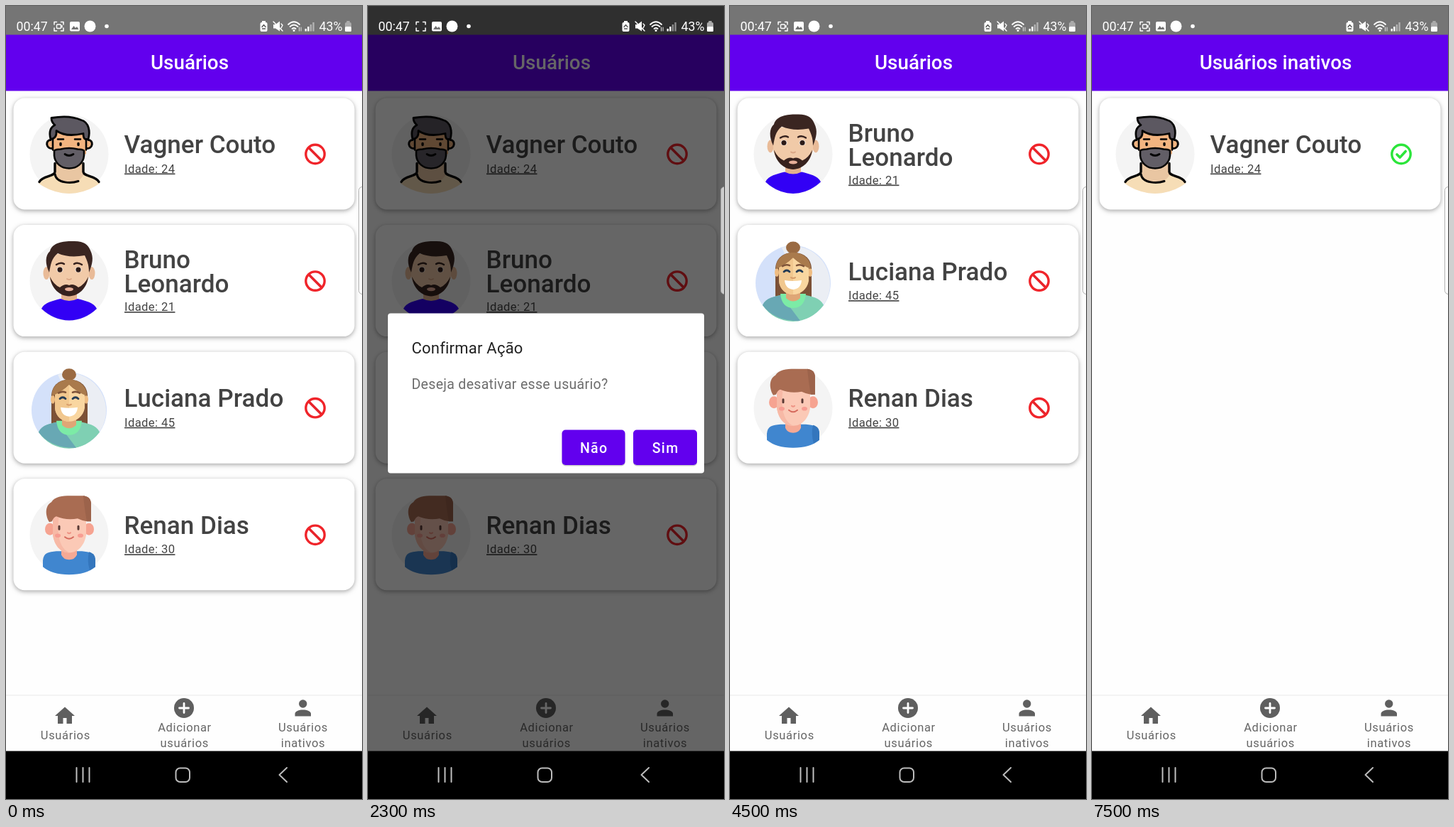
An HTML page for the animation above (8 s loop, 502 by 1116 pixels).

```html
<!DOCTYPE html>
<html lang="pt">
<head>
<meta charset="utf-8">
<title>Usuários</title>
<style>
html, body { margin: 0; width: 100%; height: 100%; overflow: hidden; background: #fff; }
svg { display: block; width: 502px; height: 1116px; font-family: Roboto, sans-serif; }
.card { fill: #fff; filter: drop-shadow(0 2px 3.5px rgba(0,0,0,.25)) drop-shadow(0 1px 2px rgba(0,0,0,.12)); }
.name { font-size: 35.1px; font-weight: 500; fill: #434343; }
.age { font-size: 16.6px; letter-spacing: .4px; fill: #444; text-decoration: underline; }
.title { font-size: 27.8px; font-weight: 500; fill: #fff; text-anchor: middle; }
.tab { font-size: 16.5px; letter-spacing: .65px; fill: #666; text-anchor: middle; }
.btn { font-size: 19.5px; font-weight: 500; letter-spacing: 1.3px; fill: #fff; text-anchor: middle; }
.status { font-size: 17.8px; fill: #fff; }
.line { fill: none; stroke-linecap: round; stroke-linejoin: round; }
</style>
</head>
<body>
<svg id="stage" viewBox="0 0 502 1116"></svg>
<script>
const PURPLE = '#6200ee';
const path = (d, fill) => `<path d="${d}" fill="${fill}"/>`;
const line = (d, color, w) => `<path class="line" d="${d}" stroke="${color}" stroke-width="${w}"/>`;
const dot = (x, y, r, fill) => `<circle cx="${x}" cy="${y}" r="${r}" fill="${fill}"/>`;
const oval = (x, y, rx, ry, fill) => `<ellipse cx="${x}" cy="${y}" rx="${rx}" ry="${ry}" fill="${fill}"/>`;
const rect = (x, y, w, h, fill, more = '') =>
  `<rect x="${x}" y="${y}" width="${w}" height="${h}" fill="${fill}" ${more}/>`;
const text = (cls, x, y, s) => `<text class="${cls}" x="${x}" y="${y}">${s}</text>`;

// Portraits, drawn around (0,0) in a disc of radius 56
function beardedMan() {
  const beard = 'M-21-5Q-18-7-12-7Q0-10 12-7Q18-7 21-5V2C20 13 11 20 0 20C-11 20-20 13-21 2Z';
  const hair = 'M-26-21C-29-32-26-38-20-41Q-25-45-25-51C-8-54 6-53 17-48C28-45 30-32 27-21H23Q20-22 20-29C2-25-11-28-18-33Q-17-22-26-21Z';
  const ink = '#050505';
  return dot(0, 0, 55.5, '#f4f4f4') +
    path('M-43 41C-38 31-27 31-20 27C-16 42 16 42 20 27C27 31 38 31 43 41Q24 55 0 55.5Q-24 55-43 41Z', '#f6ddb6') +
    path('M-20 12V30Q-14 40 0 40Q14 40 20 30V12Z', '#e9c6a2') +
    line('M-42 39C-37 30-21 32-20 25V13M42 39C37 30 21 32 20 25V13', ink, 3.4) +
    line('M-20 28C-18 42 4 41 13 38', ink, 3) +
    oval(-27, -14, 4, 6, '#f2b480') + oval(28, -14, 4, 6, '#f2b480') +
    line('M-26-20C-34-20-33-7-23-8M27-20C35-20 34-7 24-8', ink, 3) +
    path('M-23-30H24V0H-22Z', '#f2b480') + path(beard, '#625e66') +
    line('M-23-24V-6M24-24V-6', ink, 2.6) + line(beard, ink, 2.6) +
    path(hair, '#5c5861') + line(hair, ink, 2.8) +
    line('M-16-21H-8M8-21H16', ink, 2.6) + line('M-12-15V-13M13-15V-13', ink, 3.4) +
    line('M-6 0Q0 4 6 0', ink, 2.8);
}

const darkHairMan = () =>
  dot(0, 0, 55.5, '#f4f4f4') +
  oval(-32, -11, 4.5, 9, '#e9bb98') + oval(32, -11, 4.5, 9, '#e9bb98') +
  path('M-11 12H11V30Q0 36-11 30Z', '#e3b18e') +
  path('M-28-38H28V-6C25 9 14 19 0 20C-14 19-25 9-28-6Z', '#f1caa8') +
  path('M-27-6Q-22 5-13 9Q-6 3 0 6Q6 3 13 9Q22 5 27-6C25 11 13 21 0 21.500C-13 21-25 11-27-6Z', '#37221e') +
  oval(0, 11.5, 6, 2.6, '#e6ae98') +
  path('M-28-12C-34-24-34-36-27-42C-24-54-8-56 4-56C21-57 27-51 30-43C35-33 33-24 28-12C28-24 25-29 22-36Q0-32-16-39C-25-32-26-23-28-12Z', '#3a2521') +
  line('M-18-23Q-12-27-7-24M7-24Q12-27 18-23', '#37221e', 2.4) +
  oval(-13, -16, 4.4, 3.8, '#fff') + oval(13, -16, 4.4, 3.8, '#fff') +
  dot(-13, -16, 3.6, '#2c1a17') + dot(13, -16, 3.6, '#2c1a17') +
  line('M-3-3Q0-1 3-3', '#d9a585', 1.8) +
  path('M-39 39C-35 30-23 28-12 25Q0 31 12 25C23 28 35 30 39 39Q22 55 0 55.5Q-22 55-39 39Z', '#3200f5');

const smilingWoman = () =>
  dot(0, 3, 53, '#d4e1fa') + path('M-16-47A53 53 0 0 1 44 32L20 30Z', '#ebeef4') +
  oval(0, -47, 10, 8.5, '#9a6a42') +
  path('M-25 23V-18C-24-33-13-40 0-40C14-40 25-33 26-18V23H-25Z', '#7c5136') +
  path('M-43 34C-38 23-26 22-14 19H14C26 22 38 23 43 34Q26 56 0 57Q-28 56-43 34Z', '#7fd0b3') +
  path('M-43 34C-38 23-26 22-17 20L10 56Q-26 57-43 34Z', '#68a8b4') +
  path('M-18 18Q-16 38 0 38Q16 38 18 18Z', '#7ceba6') +
  path('M-10 10H10V24Q0 33-10 24Z', '#dfa676') +
  oval(-23, -12, 3, 6, '#efbd82') + oval(24, -12, 3, 6, '#efbd82') +
  path('M-20-20Q-9-24 0-33Q9-24 22-20V0C20 12 10 19 0 19C-10 19-19 12-20 0Z', '#f9d6a0') +
  path('M-20-20Q-9-24 0-33V19C-10 19-19 12-20 0Z', '#f1c78e') +
  path('M-24-17C-25-32-12-40 0-40C13-40 25-32 25-17Q10-23 0-33Q-10-23-24-17Z', '#a97a4c') +
  line('M-15-21Q-10-24-5-22M5-22Q10-24 15-21', '#80553a', 2.6) +
  line('M-13-13Q-9-17-5-13M5-13Q9-17 13-13', '#253c55', 2.8) +
  line('M-3-5Q0-3 3-5', '#d99f6c', 2) +
  path('M-12-1Q0 1 12-1Q11 11 0 12Q-11 11-12-1Z', '#fff');

const youngMan = () =>
  dot(0, 0, 55.5, '#f4f4f4') +
  path('M-37 36C-36 25-29 24-18 23H18C29 24 36 25 37 36V45Q24 56 0 56Q-24 56-37 45Z', '#4086cf') +
  path('M28 24C35 26 37 30 37 36V45L29 50Q25 36 28 24Z', '#3476bd') +
  path('M-11 18H11V28Q8 35 0 35Q-8 35-11 28Z', '#f5a995') +
  oval(-27, -8, 7, 8.5, '#f6a391') + oval(28, -8, 7, 8.5, '#f6a391') +
  path('M-23-34H24V0C22 14 13 25 0 25C-13 25-21 14-23 0Z', '#fbc9b6') +
  path('M-23-30H-14C-18 0-14 18 0 25C-13 25-21 14-23 0Z', '#f7b9a6') +
  path('M-28-18C-34-28-34-41-25-46C-20-54-10-55 2-55H20Q31-54 31-43V-19H25Q18-20 12-23Q-4-20-18-26Q-22-25-24-19Z', '#a96c52') +
  path('M20-55Q31-54 31-43V-19H25Q22-34 20-55Z', '#9c634b') +
  line('M-14-12V-8M13-12V-8', '#5a3a35', 3) +
  oval(-16, 1, 4, 2.8, '#f79d92') + oval(16, 1, 4, 2.8, '#f79d92') +
  line('M-2-3Q0-1 2-3', '#ee9384', 2) +
  line('M-6 3Q0 8 6 3', '#d56a5d', 2);

const ring = color => `<circle r="13.2" fill="none" stroke="${color}" stroke-width="3.4"/>`;
const ban = line('M-9-9L9 9', '#e8232a', 3.6) + ring('#f0242a');
const check = ring('#2be53a') + line('M-6 .5L-1.7 4.6L6.2-4', '#2be53a', 3.6);

const people = [
  { name: ['Vagner Couto'], age: 24, face: beardedMan },
  { name: ['Bruno', 'Leonardo'], age: 21, face: darkHairMan },
  { name: ['Luciana Prado'], age: 45, face: smilingWoman },
  { name: ['Renan Dias'], age: 30, face: youngMan }
];

function card(p, row, icon) {
  const two = p.name.length > 1;
  const names = p.name.map((s, i) => text('name', 166.5, (two ? 61 : 77.6) + 34 * i, s)).join('');
  return `<g transform="translate(0 ${129.5 + 178.6 * row})">
    <rect class="card" x="10.5" y="0" width="481" height="157" rx="16"/>
    <g transform="translate(89 79)">${p.face()}</g>${names}
    ${text('age', 167, two ? 121 : 105, 'Idade: ' + p.age)}
    <g transform="translate(436 79)">${icon}</g></g>`;
}

const screen = (id, title, list, icon) => `<g id="${id}">${rect(0, 0, 502, 1049, '#fefefe')}
  ${rect(0, 40, 502, 79.5, PURPLE)}${text('title', 259, 89, title)}
  ${list.map((p, i) => card(p, i, icon)).join('')}</g>`;

const tabs = rect(0, 970, 502, 79, '#fefefe') + rect(0, 969, 502, 2, '#f3f3f3') +
  path('M83 986.5L69 999H73V1010H80.5V1002H85.5V1010H93V999H97Z', '#5f5f5f') +
  text('tab', 83.8, 1032, 'Usuários') +
  dot(251, 988, 14, '#5f5f5f') + line('M251 981.5V994.5M244.5 988H257.5', '#fff', 2.8) +
  text('tab', 252, 1021, 'Adicionar') + text('tab', 251.8, 1043, 'usuários') +
  dot(418.7, 982, 5.7, '#5f5f5f') + path('M407.5 999.5V996C407.5 988.5 430 988.5 430 996V999.5Z', '#5f5f5f') +
  text('tab', 419, 1021, 'Usuários') + text('tab', 419, 1043, 'inativos');

const button = (x, w, label) =>
  rect(x, 598, w, 49.5, 'rgba(0,0,0,.2)', 'rx="5"') + rect(x, 596.5, w, 49.5, PURPLE, 'rx="5"') +
  text('btn', x + w / 2 + .6, 628.5, label);

const dialog = `<g id="dialog">${rect(28, 432.5, 446, 225, '#fff', 'rx="4"')}
  <text x="61.5" y="488.5" font-size="22" letter-spacing=".22" fill="#222">Confirmar Ação</text>
  <text x="61.5" y="538.5" font-size="19.5" letter-spacing=".31" fill="#6d6d6d">Deseja desativar esse usuário?</text>
  ${button(273.5, 89, 'Não')}${button(374, 90, 'Sim')}
  <g clip-path="url(#yes)"><circle id="tap" cx="420" cy="633" fill="#fff"/></g></g>`;

const status = text('status', 14.5, 35, '00:47') +
  line('M68 26V22.5H71.5M77.5 22.5H81V26M81 31V35H77.5M71.5 35H68V31', '#fff', 1.5) +
  '<g id="scan">' + rect(71.5, 26, 6, 5.5, 'none', 'rx="1" stroke="#fff" stroke-width="1.4"') + line('M79 27.5V30', '#fff', 1.4) + '</g>' +
  rect(90, 22, 14, 13.5, '#fff', 'rx="2"') + path('M92 33L95.5 28L98 31L100 29L102.5 33Z', '#707070') +
  dot(118.5, 28.5, 8, '#fff') + dot(142, 28.5, 2.8, '#fff') +
  rect(358.5, 23, 10, 13, '#fff', 'rx="2"') + rect(361, 21, 5, 3, '#fff') +
  line('M361 29.5L363.5 26.5L366 29.5M361.5 32H365.5', '#555', 1.4) +
  path('M377 26H380L386 21.5V35.5L380 31.5H377Z', '#fff') + line('M377 22L390 35', '#fff', 1.5) +
  line('M388 25L390 27L388 31', '#fff', 1.4) +
  line('M398 26Q406 18.5 414 26M400.5 29Q406 24 411.5 29M403.5 32Q406 30 408.5 32', '#fff', 1.8) +
  dot(406, 34.5, 1.5, '#fff') + line('M413.5 30V35M416 30V35', '#ddd', 1.1) +
  [0, 1, 2, 3].map(i => rect(421.5 + 3.6 * i, 32 - 3 * i, 2.4, 3.5 + 3 * i, '#fff', `opacity="${i < 2 ? 1 : .45}"`)).join('') +
  text('status', 441.5, 35, '43%') +
  rect(478, 23, 9, 13, '#aaa', 'rx="2"') + rect(480.3, 21, 4.4, 2.5, '#aaa') + rect(478, 29, 9, 7, '#fff', 'rx="1.5"');

const system = rect(0, 1048.5, 502, 68, '#000') +
  line('M99.5 1072V1092M108.5 1072V1092M117.5 1072V1092', '#c0c0c0', 2) +
  rect(239.5, 1072.5, 19.5, 19.5, 'none', 'rx="6" stroke="#bcbcbc" stroke-width="2"') +
  line('M396 1072L385.5 1082L396 1092', '#bcbcbc', 2);

const stage = document.getElementById('stage');
stage.innerHTML = `<defs><clipPath id="yes"><rect x="374" y="596.5" width="90" height="49.5" rx="5"/></clipPath></defs>
  ${screen('all', 'Usuários', people, ban)}
  ${screen('rest', 'Usuários', people.slice(1), ban)}
  ${screen('inactive', 'Usuários inativos', people.slice(0, 1), check)}
  <circle id="press" cx="435.5" cy="208.5"/>
  ${rect(0, 0, 502, 40.5, '#757575')}${tabs}
  ${rect(0, 0, 502, 1049, '#000', 'id="dim"')}${dialog}
  ${rect(497.5, 254.5, 12, 151, 'rgba(255,255,255,.68)', 'rx="5" stroke="rgba(150,150,150,.75)"')}
  ${status}${system}`;

const el = id => document.getElementById(id);
const set = (id, attrs) => { for (const k in attrs) el(id).setAttribute(k, attrs[k]); };
const show = (id, on) => set(id, { display: on ? 'inline' : 'none' });

// Linear track through [time, value] pairs
function track(t, keys) {
  let [t0, v0] = keys[0];
  if (t <= t0) return v0;
  for (const [t1, v1] of keys) {
    if (t < t1) return v0 + (v1 - v0) * (t - t0) / (t1 - t0);
    [t0, v0] = [t1, v1];
  }
  return v0;
}

function draw(ms) {
  const t = Math.floor(ms % 8000 / 100) * 100;
  show('all', t < 2700);
  show('rest', t >= 2700 && t < 4900);
  show('inactive', t > 4600);
  set('inactive', { opacity: track(t, [[4600, 0], [4900, 1]]) });
  set('press', { r: track(t, [[700, 8], [900, 28]]), opacity: track(t, [[700, 0], [800, .1], [1000, .11], [1200, 0]]) });
  set('dim', { opacity: track(t, [[900, 0], [1000, .23], [1100, .5], [1200, .6], [2600, .6], [2700, .54], [2800, .35], [2900, .1], [3000, 0]]) });
  const alpha = track(t, [[900, 0], [1000, .8], [1100, 1], [2700, 1], [2800, .7], [2900, .1], [3000, 0]]);
  const shift = track(t, [[900, 16], [1000, 6], [1100, 1.5], [1200, 0], [2700, 0], [2800, -4.5], [2900, -9]]);
  show('dialog', alpha > 0);
  set('dialog', { opacity: alpha, transform: `translate(0 ${shift})` });
  set('tap', { r: track(t, [[2600, 7], [2800, 15], [2900, 26]]), opacity: track(t, [[2500, 0], [2600, .2], [2800, .3], [2900, .2]]) });
  show('scan', t < 1200 || t >= 2600);
}

function loop() {
  draw(performance.now());
  requestAnimationFrame(loop);
}
loop();
</script>
</body>
</html>
```
